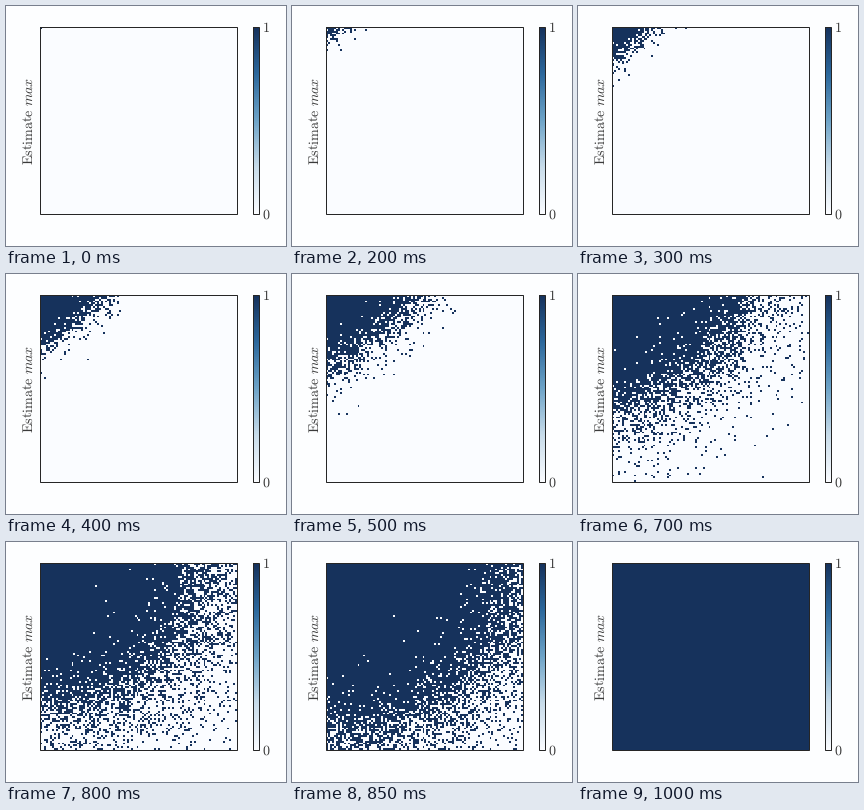
These frames come from a looping animation (280x240 px, 4.95 s). A matplotlib script:

```python
import numpy as np
import matplotlib.pyplot as plt
from matplotlib.animation import FuncAnimation
from matplotlib.colors import LinearSegmentedColormap, ListedColormap
from matplotlib.patches import Rectangle

W, H, DPI = 280, 240, 100
N = 100            # agents per side
STEP = 50          # ms per step
FRAMES = 99
FULL = 20          # step at which every agent knows the maximum
DARK, LIGHT, PAPER = "#16325c", "#fafcff", "#fdfeff"
LINE, INK = "#262626", "#3a3a3a"
BLUES = LinearSegmentedColormap.from_list(
    "blues", [LIGHT, "#c8dcea", "#6ea4c8", "#2c689c", DARK])

plt.rcParams["mathtext.fontset"] = "cm"
plt.rcParams["text.hinting"] = "none"

# Front of the spreading estimate: radius, inner and outer width, roundness
KEYS = [0, 4, 8, 10, 12, 14, 16, 18, 19]
RADIUS = [0, 9, 34, 49, 64, 75, 91, 124, 165]
INNER = [0.5, 2.5, 4, 6, 8.5, 9, 9, 9, 10]
OUTER = [0.5, 3, 4.5, 6, 8.5, 13, 15, 16, 16]
ROUND = [1, 1, 1.05, 1.1, 1.15, 1.4, 2, 2, 2]


def spread():
    """Which agents hold the maximum at each step."""
    rng = np.random.default_rng(7)
    luck = rng.random((N, N))
    y, x = np.mgrid[0:N, 0:N].astype(float)
    x += 5 * (x > 67)
    y *= 1.13
    states = np.zeros((FULL + 1, N, N), bool)
    states[:, 0, 0] = True
    for k in range(1, FULL):
        r, win, wout, p = (np.interp(k, KEYS, v)
                           for v in (RADIUS, INNER, OUTER, ROUND))
        gap = r - (x**p + y**p) ** (1 / p)
        z = gap / np.where(gap > 0, win, wout)
        states[k] |= luck < 1 / (1 + np.exp(-np.clip(z, -40, 40)))
    states[FULL] = True
    return np.logical_or.accumulate(states)


states = spread()

fig = plt.figure(figsize=(W / DPI, H / DPI), dpi=DPI, facecolor=PAPER)
ax = fig.add_axes([0, 0, 1, 1])
ax.axis("off")


def panel(data, cmap, left, right, top=21, bottom=208):
    img = ax.imshow(data, cmap=cmap, vmin=0, vmax=1, aspect="auto",
                    interpolation="nearest",
                    extent=(left, right, bottom, top))
    ax.add_patch(Rectangle((left, top), right - left, bottom - top,
                           fill=False, ec=LINE, lw=0.72, zorder=3))
    return img


grid = panel(states[0], ListedColormap([LIGHT, DARK]), 34, 231)
panel(np.linspace(1, 0, 187)[:, None], BLUES, 247, 253)
ax.set_xlim(0, W)
ax.set_ylim(H, 0)

ax.text(27, 114.5, r"$\mathrm{Estimate}\ max$", size=10.15, color=INK,
        rotation=90, rotation_mode="anchor", ha="center", va="baseline")
for label, y in (("$1$", 25.5), ("$0$", 212.5)):
    ax.text(256.5, y, label, size=10.15, color=INK, ha="left", va="baseline")


def update(i):
    grid.set_data(states[min(i, FULL)])
    return [grid]


anim = FuncAnimation(fig, update, frames=FRAMES, interval=STEP, repeat=True)
plt.show()
```
